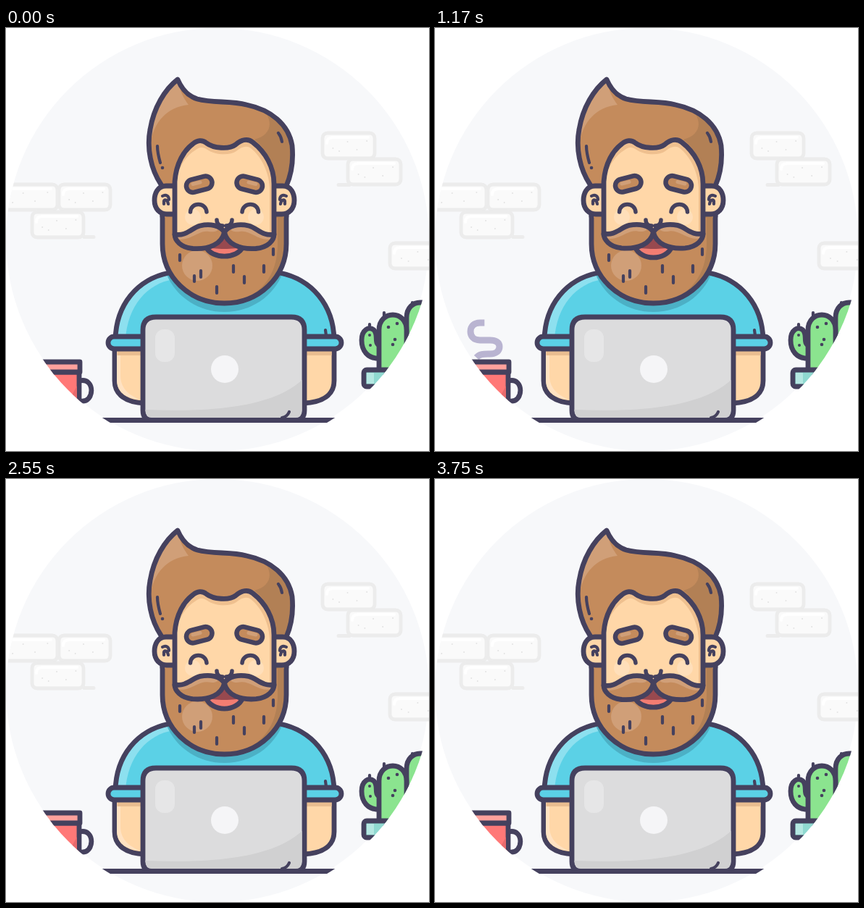
An HTML page for the animation above (3.78 s loop, 584 px wide and 584 px high).

```html
<!DOCTYPE html>
<html lang="en">
<head>
<meta charset="utf-8">
<title>At the laptop</title>
<style>
  html, body { margin: 0; width: 100%; height: 100%; overflow: hidden; background: #fff; }
  svg { display: block; width: 100vw; height: 100vh; }
  .ln { stroke: #45415e; stroke-width: 6.8; stroke-linecap: round; stroke-linejoin: round; }
  .mid { stroke-width: 5.5; }
  .thin { stroke-width: 4.2; }
  .no { fill: none; }
  .hair { fill: #c48b5c; }
  .lit { fill: #d09f78; }
  .dim { fill: #b28055; }
  .skin { fill: #ffd7a8; }
  .blue { fill: #5bd1e6; }
  .green { fill: #8be48f; }
  .ink { fill: #45415e; }
</style>
</head>
<body>
<svg viewBox="0 0 584 584">
  <defs>
    <clipPath id="disc"><circle cx="293.500" cy="292.500" r="293.500"/></clipPath>
    <path id="torso" d="M151 430C152 382 181 347 225 338H378C422 347 452 382 453 430Z"/>
    <clipPath id="torsoClip"><use href="#torso"/></clipPath>
    <path id="jaw" d="M216 240V298C216 344 254 380 301.500 380S387 344 387 298V240Z"/>
    <clipPath id="jawClip"><use href="#jaw"/></clipPath>
    <path id="hair" d="M214 216C200 195 194 166 199 140C204 110 219 85 237 71C243 85 251 94 264 98C286 104 310 100 332 106C366 113 390 133 395 162C397 183 394 202 387 218V260H216Z"/>
    <clipPath id="hairClip"><use href="#hair"/></clipPath>
    <path id="face" d="M233 285V212C235 186 246 169 258 160C264 155 271 154 277 159C286 166 308 168 317 161C325 154 334 152 341 158C358 171 370 192 370 215V285"/>
    <clipPath id="faceClip"><use href="#face"/></clipPath>
    <path id="stache" d="M301.500 282C296 272 281 270 268 273C256 276 249 288 233 285C233 293 241 303 258 304.500C281 306 298 298 301.500 282Z"/>
    <clipPath id="stacheClip"><use href="#stache"/></clipPath>
    <g id="ear">
      <path class="ln skin" d="M233 218H221C209 218 205 229 205 238C205 249 212 257 222 257H233"/>
      <path class="ln thin no" d="M216 232C221 229 225 232 225 237M218 243V239C219 236 223 237 224 243"/>
    </g>
    <g id="whisker">
      <use href="#stache" class="hair"/>
      <path class="lit" clip-path="url(#stacheClip)" d="M232 284C250 290 258 268 284 271C300 276 292 283 280 281C266 278 254 296 234 291Z"/>
      <use href="#stache" class="ln no"/>
    </g>
    <g id="eye">
      <circle cx="258" cy="261" r="11" fill="#ffdfba"/>
      <path class="ln mid no" d="M254.500 254C255 240 276 240 277 254"/>
    </g>
    <g id="brow" stroke-linecap="round">
      <path d="M258 218L275.500 213.500" stroke="#45415e" stroke-width="24.500"/>
      <path d="M258 218L275.500 213.500" stroke="#c48b5c" stroke-width="11.500"/>
      <path d="M258 215.500L268 213" stroke="#d09f78" stroke-width="5"/>
    </g>
  </defs>

  <circle cx="292" cy="292" r="292" fill="#f7f8fa"/>
  <g clip-path="url(#disc)">
    <g id="bricks"></g>
    <path class="no" stroke="#ececec" stroke-width="5" stroke-linecap="round" d="M459 216.500H474M108 288.500H121"/>

    <path id="steam" class="no" stroke="#b9b4d1" stroke-width="9" pathLength="193"
      d="M55 458C60 450 66 450 73 450H76C84 450 89 446 89 440C89 434 84 431 76 431H62C53 431 49 425 49 419C49 412 54 407 62 407H76C84 407 89 402 89 394C89 386 84 380 76 380H53"/>

    <path class="ln" fill="#f7f8fa" d="M102 487C123 482 123 518 103 515"/>
    <path class="ln" fill="#ff7877" d="M30 475H101V530H30Z"/>
    <path fill="#e86a6c" d="M98 494V520H84Z"/>
    <path class="ln" fill="#ffa19c" d="M30 461H102V475H30Z"/>

    <path class="ln green" d="M553 425V400C553 386 562 379 572 379H600V460H553Z"/>
    <path class="ln green" d="M516 456C499 457 491 445 491 431C491 417 501 411 508 417C515 425 507 434 516 439Z"/>
    <path class="ln green" d="M515 475V417C515 389 553 389 553 417V475Z"/>
    <path class="ln thin no" d="M522 393V398M502 409V414M561 379V382"/>
    <g class="ink">
      <circle cx="528" cy="413" r="2.300"/><circle cx="540" cy="408" r="2.300"/><circle cx="537" cy="430" r="2.300"/>
      <circle cx="534" cy="437" r="2.300"/><circle cx="502" cy="424" r="2"/><circle cx="503" cy="438" r="2"/>
    </g>
    <rect class="ln" x="494" y="472" width="90" height="23" rx="4" fill="#8fd9d0"/>
    <path d="M498 476H508V491H498Z" fill="#b5e8e2"/>
    <path class="ln" d="M130 541.500H455"/>
  </g>

  <path class="ln skin" d="M150 440V487C150 506 165 517 192 518V440Z"/>
  <path class="ln skin" d="M453 440V487C453 506 438 517 410 518V440Z"/>
  <path fill="#ffe2c2" d="M153 446H158V480C158 496 168 506 184 513C164 511 153 501 153 487Z"/>
  <path fill="#e9bd90" d="M153.400 440H190V452H153.400ZM412 440H449.600V452H412Z"/>
  <use href="#torso" class="blue"/>
  <g clip-path="url(#torsoClip)">
    <path fill="#8de0ef" d="M151 430C152 382 181 347 225 338L231 347C195 353 168 383 165 430Z"/>
    <use href="#jaw" id="shade" fill="#4cb0c5"/>
  </g>
  <use href="#torso" class="ln no"/>
  <path class="ln thin" d="M441 417L442 425"/>
  <rect class="ln blue" x="141" y="426" width="322" height="17" rx="8.500"/>

  <g id="head">
    <use href="#hair" class="hair"/>
    <g clip-path="url(#hairClip)">
      <path class="lit" d="M237 71L190 100V165L199 160C204 130 222 109 252 106C246 98 240 88 237 71Z"/>
      <path class="dim" d="M355 112C370 130 366 148 343 154C360 166 371 190 371 222H400V130Z"/>
    </g>
    <use href="#hair" class="ln no"/>
    <use href="#jaw" class="hair"/>
    <g clip-path="url(#jawClip)">
      <path class="dim" d="M375 240H390V382H301C350 374 375 344 375 298Z"/>
      <circle class="lit" cx="264" cy="328" r="21"/>
    </g>
    <use href="#jaw" class="ln no"/>
    <path class="hair" d="M219.400 216H231V262H219.400Z"/>
    <path class="dim" d="M372 216H383.600V262H372Z"/>
    <use href="#ear"/>
    <use href="#ear" transform="matrix(-1 0 0 1 603 0)"/>
    <use href="#face" class="skin"/>
    <path clip-path="url(#faceClip)" fill="#efc08f" d="M230 222C238 191 249 176 261 169C267 164 272 164 278 168C288 175 308 177 318 170C326 163 333 162 338 166C352 177 363 198 364 221V290H380V140H230Z"/>
    <use href="#face" class="ln no"/>
    <path class="ln thin no" d="M209 163C209 172 211 179 213 186M376 145Q380 150 381 157"/>
    <circle class="ink" cx="216" cy="193" r="2.300"/>
    <path class="ln thin no" d="M240 313V321M260 342V350M269 335V344M291 357V366M314 328V337M329 343V352M356 328V337M369 305V313"/>
    <use href="#eye"/>
    <use href="#eye" transform="matrix(-1 0 0 1 603 0)"/>
    <g id="brows">
      <use href="#brow"/>
      <use href="#brow" transform="matrix(-1 0 0 1 603 0)"/>
    </g>
    <path id="mouth" fill="#98494f"/>
    <path id="tongue" fill="#f27d72"/>
    <path id="lip" class="ln no"/>
    <path class="ln mid no" d="M291 265C291 270 294 273 299 273M312 265C312 270 309 273 304 273"/>
    <use href="#whisker" id="left"/>
    <use href="#whisker" id="right"/>
  </g>

  <path class="ln" fill="#dcdcdd" d="M189 417Q189 399 207 399H394Q412 399 412 417V528Q412 541.500 399 541.500H202Q189 541.500 189 528Z"/>
  <path fill="#d0d0d1" d="M192.400 527C275 530 365 526 408.600 486V528Q408.600 538 399 538H202Q193 538 192.400 527Z"/>
  <rect x="206" y="416" width="27" height="45" rx="12" fill="#e6e6e7"/>
  <path class="ln thin no" d="M381 538Q388 537 391 530"/>
  <circle cx="302" cy="471" r="19" fill="#f5f5f7"/>
</svg>
<script>
const LOOP = 3780;
const $ = id => document.getElementById(id);
const set = (id, name, value) => $(id).setAttribute(name, value);

// Each brick: x, y, width
const bricks = [[-20, 216, 91], [73, 216, 71], [36, 254, 71], [437, 145, 72], [472, 181, 73], [530, 297, 80]];
$('bricks').innerHTML = bricks.map(([x, y, w]) => {
  const dots = [[.2, 21], [.32, 25], [.48, 12], [.66, 23], [.85, 11]].map(([u, v]) =>
    `<circle cx="${x + w * u}" cy="${y + v}" r="1" fill="#e3e3e3"/>`).join('');
  return `<rect x="${x}" y="${y}" width="${w}" height="35" rx="7" fill="#fafafa" stroke="#ececec" stroke-width="5"/>
    <path d="M${x + 6} ${y + 14}Q${x + 6} ${y + 6} ${x + 14} ${y + 6}H${x + w - 9}" fill="none" stroke="#fff" stroke-width="4" stroke-linecap="round"/>${dots}`;
}).join('');

// Linear interpolation through [time, value] steps
function track(steps, t) {
  if (t <= steps[0][0]) return steps[0][1];
  for (let i = 1; i < steps.length; i++) {
    const [a, u] = steps[i - 1], [b, v] = steps[i];
    if (t <= b) return u + (v - u) * (t - a) / (b - a);
  }
  return steps[steps.length - 1][1];
}
const wave = p => (1 - Math.cos(2 * Math.PI * p)) / 2;

const steamHead = [[300, 0], [660, 47], [1170, 120], [1530, 163], [1900, 193]];
const steamTail = [[1140, 0], [1530, 44], [2160, 149], [2280, 165]];
const steamFade = [[1170, 1], [1530, .88], [2160, .24], [2280, 0]];

function draw(t) {
  const bob = t < 1110 ? 3 * wave(t / 1110) : 0;
  const smile = wave(t / LOOP);
  set('head', 'transform', `translate(0 ${bob})`);
  set('shade', 'transform', `translate(0 ${12 + bob})`);
  set('brows', 'transform', `translate(0 ${-.7 * smile})`);

  const tilt = `rotate(${1.4 * smile} 301.5 283)`;
  set('left', 'transform', tilt);
  set('right', 'transform', `matrix(-1 0 0 1 603 0) ${tilt}`);

  const low = 319.5 + 3.6 * smile;
  const curve = `M276 302C284 ${low} 319 ${low} 327 302`;
  set('mouth', 'd', curve + 'L301.5 284Z');
  set('lip', 'd', curve);
  set('tongue', 'd', `${curve}C319 306 284 306 276 302Z`);

  const head = track(steamHead, t), tail = track(steamTail, t);
  const fade = head > tail ? track(steamFade, t) : 0;
  set('steam', 'stroke-dasharray', `${Math.max(head - tail, .01)} 400`);
  set('steam', 'stroke-dashoffset', -tail);
  set('steam', 'opacity', fade);
}

const start = performance.now();
function tick() {
  draw((performance.now() - start) % LOOP);
  requestAnimationFrame(tick);
}
tick();
</script>
</body>
</html>
```
